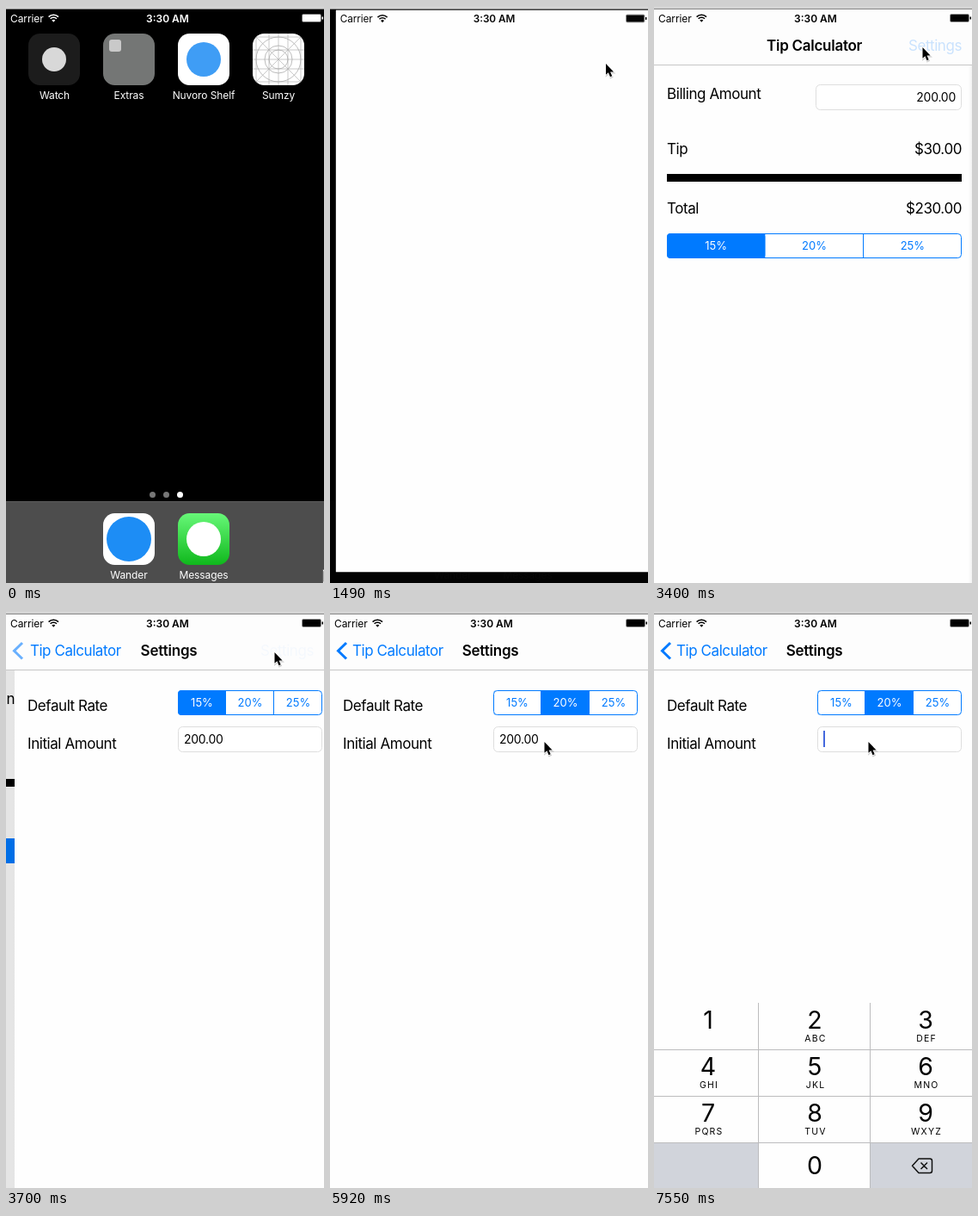
An HTML page for the animation above (8000 ms loop, 370 by 670 pixels).

```html
<!DOCTYPE html>
<html lang="en">
<head>
<meta charset="utf-8">
<title>Tip Calculator</title>
<style>
html, body { margin: 0; width: 100%; height: 100%; overflow: hidden; background: #000; }
svg { display: block; width: 370px; height: 670px; font: 17px Inter, Roboto, sans-serif; letter-spacing: -.43px; }
text { white-space: pre; }
.bold { font-weight: 600; letter-spacing: -.26px; }
.small { font-size: 12px; letter-spacing: -.1px; }
.clock { font-weight: 600; letter-spacing: 0; }
.field { font-size: 14px; letter-spacing: -.25px; }
.seg { font-size: 13px; letter-spacing: 0; }
.digit { font-size: 28.5px; letter-spacing: 0; }
.letters { font-size: 10.5px; letter-spacing: 1.2px; }
.mid { text-anchor: middle; }
.end { text-anchor: end; }
</style>
</head>
<body>
<svg id="stage" viewBox="0 0 370 670"></svg>
<script>
const BLUE = '#007aff', LOOP = 8000, STEP = 147.9;

// Drawing helpers
const text = (x, y, s, cls = '', fill = '#000', id = '') =>
  `<text x="${x}" y="${y}" class="${cls}" fill="${fill}" ${id && `id="${id}"`}>${s}</text>`;
const rect = (x, y, w, h, fill, more = '') =>
  `<rect x="${x}" y="${y}" width="${w}" height="${h}" fill="${fill}" ${more}/>`;
const circle = (x, y, r, fill, more = '') =>
  `<circle cx="${x}" cy="${y}" r="${r}" fill="${fill}" ${more}/>`;
const path = (d, stroke, width, more = '') =>
  `<path d="${d}" fill="none" stroke="${stroke}" stroke-width="${width}" ${more}/>`;
const group = (id, body) => `<g id="${id}">${body}</g>`;

const status = c =>
  text(5, 18.5, 'Carrier', 'small', c) +
  path('M49.6 12.6a8 8 0 0 1 11.4 0M51.6 14.8a5.2 5.2 0 0 1 7.4 0', c, 1.6) +
  `<path d="M55.3 18.8l-2-2.2a2.9 2.9 0 0 1 4 0z" fill="${c}"/>` +
  text(188, 18.5, '3:30 AM', 'small clock mid', c) +
  rect(344.5, 9.5, 22, 9, 'none', `rx="1.5" stroke="${c}" stroke-opacity=".4"`) +
  rect(345, 10, 21, 8, c, 'rx=".8"') +
  rect(367.5, 12.5, 1.5, 3, c);

const tile = (x, y, fill) => rect(x, y, 60, 60, fill, 'rx="13.5"');
const label = (x, y, s) => text(x, y, s, 'small mid', '#fff');

function gridIcon() {
  let d = 'M0 0L60 60M60 0L0 60';
  for (const p of [4, 19, 30, 41, 56]) d += `M${p} 0V60M0 ${p}H60`;
  const rings = [11, 16, 26].map(r => circle(30, 30, r, 'none', 'stroke="#aaa" stroke-width=".8"')).join('');
  return tile(287, 32, '#fff') +
    `<g transform="translate(287 32)" clip-path="url(#icon)">${path(d, '#b4b4b4', .7)}${rings}</g>`;
}

const home = () =>
  group('apps',
    tile(26, 32, '#1c1c1c') + circle(56, 62, 14, '#d8d8d8') + label(56.5, 108, 'Watch') +
    tile(113, 32, '#747675') + rect(120, 39, 14, 14, '#c9c9c9', 'rx="3"') + label(143, 108, 'Extras') +
    tile(200, 32, '#fff') + circle(230, 62, 20, '#3f9df5') + label(230, 108, 'Nuvoro Shelf') +
    gridIcon() + group('press', tile(287, 32, '#000')) + label(317, 108, 'Sumzy')) +
  group('dock',
    [170.5, 186.5, 202.5].map((x, i) => circle(x, 567.5, 3.5, i < 2 ? '#777' : '#fff')).join('') +
    rect(0, 575, 370, 95, '#4d4d4d') + rect(0, 575, 370, 1, '#5c5c5c') +
    tile(113, 589, '#fff') + circle(143, 619, 26, '#1d8df5') + label(143, 665, 'Wander') +
    tile(200, 589, 'url(#green)') + circle(230, 619, 20, '#fff') + label(230, 665, 'Messages') +
    status('#fff'));

function segments(x, y, w, chosen) {
  const part = w / 3;
  const body = ['15%', '20%', '25%'].map((s, i) =>
    (i === chosen ? rect(x + i * part, y, part, 29, BLUE, i ? '' : 'rx="4"') : '') +
    (i === 0 && chosen === 0 ? rect(x + 6, y, part - 6, 29, BLUE) : '') +
    (i ? rect(Math.round(x + i * part) - 1, y, 1, 29, BLUE) : '') +
    text(x + (i + .5) * part, y + 19, s, 'seg mid', i === chosen ? '#fff' : BLUE)).join('');
  return rect(x, y, w, 29, '#fff', 'rx="4"') + body +
    rect(x + .5, y + .5, w - 1, 28, 'none', `rx="4" stroke="${BLUE}"`);
}

const field = (x, y, w) => rect(x + .5, y + .5, w - 1, 29, '#fff', 'rx="5" stroke="#dedede"');

const calculator = () =>
  rect(0, 69, 375, 601, '#fefefe') +
  text(15, 108, 'Billing Amount') + field(188, 91, 170) + text(351, 111, '200.00', 'field end') +
  text(15, 172, 'Tip') + text(358, 172, '$30.00', 'end') +
  rect(15, 195, 343, 9, '#000') +
  text(15, 241, 'Total') + text(358, 241, '$230.00', 'end') +
  segments(15, 264, 343, 0);

const settings = () =>
  rect(-9, 69, 9, 601, 'url(#shade)', 'id="shadow"') +
  rect(0, 69, 375, 601, '#fefefe') +
  text(15, 116, 'Default Rate') + segments(190, 92, 168, 0) +
  group('hold', rect(246, 93, 55, 27, BLUE)) + group('second', segments(190, 92, 168, 1)) +
  text(15, 160, 'Initial Amount') + field(190, 134, 168) +
  text(197, 154, '200.00', 'field', '#000', 'amount') + rect(197, 139, 2, 19, '#4468dd', 'id="caret"');

const navbar = () =>
  rect(0, 4, 375, 64, '#fdfdfd') + rect(0, 68, 375, 1, '#c6c6c6') + status('#000') +
  group('title', text(131, 52, 'Tip Calculator', 'bold')) +
  group('button', text(358, 52, 'Settings', 'end', BLUE)) +
  group('chevron', path('M19 37L9.5 46.2L19 55.5', BLUE, 3)) +
  group('back', text(26, 52, 'Tip Calculator', '', BLUE)) +
  group('heading', text(186.5, 52, 'Settings', 'bold mid'));

function keypad() {
  const xs = [63, 187, 316];
  const names = ['', 'ABC', 'DEF', 'GHI', 'JKL', 'MNO', 'PQRS', 'TUV', 'WXYZ'];
  const keys = names.map((s, i) => {
    const x = xs[i % 3], y = 54 * Math.floor(i / 3);
    return text(x, y + 30, i + 1, 'digit mid') + text(x + 1, y + 45, s, 'letters mid');
  }).join('');
  return rect(0, 0, 375, 215, '#fefefe') +
    rect(0, 162, 121, 53, '#d1d4db') + rect(252, 162, 123, 53, '#d1d4db') +
    path('M0 54.5H375M0 108.5H375M0 162.5H375M121.5 0V215M251.5 0V215', '#bcbcbe', 1) + keys +
    text(187, 199, '0', 'digit mid') +
    path('M308 181H321Q323.5 181 323.5 183.5V195Q323.5 197.5 321 197.5H308L300.5 189.25ZM310.5 185.5L318 193M318 185.5L310.5 193', '#111', 1.5, 'stroke-linejoin="round"');
}

const arrow = 'M0 0V12.8L2.9 10.2L5 15.2L7.2 14.2L5.1 9.4H9.1Z';
const stage = document.getElementById('stage');
stage.innerHTML = `
  <defs>
    <clipPath id="icon">${rect(0, 0, 60, 60, '#000', 'rx="13.5"')}</clipPath>
    <linearGradient id="shade">
      <stop offset="0" stop-opacity="0"/><stop offset="1" stop-opacity=".12"/>
    </linearGradient>
    <linearGradient id="green" x2="0" y2="1">
      <stop offset="0" stop-color="#67f878"/><stop offset="1" stop-color="#0fb81c"/>
    </linearGradient>
  </defs>` +
  rect(0, 0, 370, 670, '#000') + group('home', home()) +
  group('launch', rect(0, 4, 375, 667, '#fefefe', 'id="sheet"') + group('bar', status('#000'))) +
  group('app',
    group('main', calculator()) + group('dim', rect(0, 69, 375, 601, '#000')) +
    group('panel', settings()) + navbar() + group('keys', keypad())) +
  rect(0, 0, 370, 3, '#d4d4d4') + rect(0, 3, 370, 1, '#858585') +
  group('cursor',
    `<path d="${arrow}" transform="translate(.4 1.2)" opacity=".2" stroke="#000" stroke-width="1.6"/>` +
    `<path d="${arrow}" stroke="#fff" stroke-width="1.6" paint-order="stroke"/>`);

const el = {};
stage.querySelectorAll('[id]').forEach(n => el[n.id] = n);

// Motion helpers
const clamp = v => Math.max(0, Math.min(1, v));
const lerp = (a, b, p) => a + (b - a) * p;
const ramp = (t, from, to) => clamp((t - from) / (to - from));
const remain = (ms, rate) => { const x = Math.max(0, ms) / 1000 * rate; return (1 + x) * Math.exp(-x); };
const fade = (id, v) => el[id].setAttribute('opacity', v);
const show = (id, on) => el[id].style.display = on ? '' : 'none';
const move = (id, x, y = 0, more = '') => el[id].setAttribute('transform', `translate(${x} ${y}) ${more}`);

// time, x, y of the pointer tip
const pointer = [
  [290, 369.7, 656], [1050, 321, 67], [2300, 321, 67], [2800, 318, 32], [3260, 312.5, 48],
  [3850, 312.5, 48], [4590, 286, 109], [5520, 286, 109], [5920, 249.5, 152], [LOOP, 249.5, 152]
];

function pointerAt(t) {
  const i = pointer.findIndex(k => k[0] > t);
  if (i < 1) return pointer[0].slice(1);
  const [a, b] = [pointer[i - 1], pointer[i]];
  const p = ramp(t, a[0], b[0]), e = p * p * (3 - 2 * p);
  return [lerp(a[1], b[1], e), lerp(a[2], b[2], e)];
}

function drawLaunch(t) {
  const p = t < 1630 ? 1 - remain(t - 1265, 25.8) : 1;
  const x = lerp(287, 0, p), y = lerp(32, 4, p), w = lerp(60, 375, p), h = lerp(60, 667, p);
  show('home', p < 1);
  fade('apps', 1 - p);
  fade('dock', 1 - p);
  fade('press', t > 1150 ? .4 : 0);
  move('apps', x, y, `scale(${w / 60}) translate(-287 -32)`);
  show('launch', p > 0);
  const box = { x, y, width: w, height: h, rx: 13.5 * (1 - p) };
  for (const k in box) el.sheet.setAttribute(k, box[k]);
  fade('sheet', clamp(p * 3));
  fade('bar', p);
  move('bar', x, y, `scale(${w / 375}) translate(0 -4)`);
}

function drawApp(t) {
  const shown = ramp(t, 1700, 1850);
  show('app', shown > 0);
  fade('app', shown);

  const r = t < 4200 ? remain(t - 3405, 18.5) : 0, p = 1 - r;
  move('main', Math.round(-112 * p));
  fade('dim', .1 * p);
  show('panel', t > 3395);
  move('panel', Math.round(375 * r));
  fade('shadow', r);
  fade('button', t < 3230 ? 1 : p < 1 ? .2 * Math.sqrt(r) : 0);
  fade('title', clamp(1 - 2 * p));
  move('title', -105 * p);
  fade('back', clamp(2 * p - .9));
  move('back', 70 * r);
  fade('chevron', ramp(t, 3450, 3880));
  fade('heading', p);
  move('heading', 111 * r);

  fade('hold', t > 4990 && t < 5400 ? .2 : 0);
  fade('second', ramp(t, 5100, 5300));

  // Held delete key clears the amount one character at a time
  const gone = t < 6800 ? 0 : t < 7040 ? 1 : Math.min(6, Math.floor((t - 6940) / 100));
  el.amount.textContent = '200.00'.slice(0, 6 - gone);
  show('caret', t > 6200);
  const width = gone < 6 ? el.amount.getComputedTextLength() : 0;
  el.caret.setAttribute('x', 197 + width);
  show('keys', t > 6200);
  move('keys', 0, 455 + 215 * remain(t - 6200, 18));
}

function draw(now) {
  const raw = now % LOOP;
  const t = raw < 290 ? 0 : 300 + Math.floor((raw - 290) / STEP) * STEP;
  drawLaunch(t);
  drawApp(t);
  move('cursor', ...pointerAt(t));
}

const start = performance.now();
function tick() {
  draw(performance.now() - start);
  requestAnimationFrame(tick);
}
tick();
</script>
</body>
</html>
```
